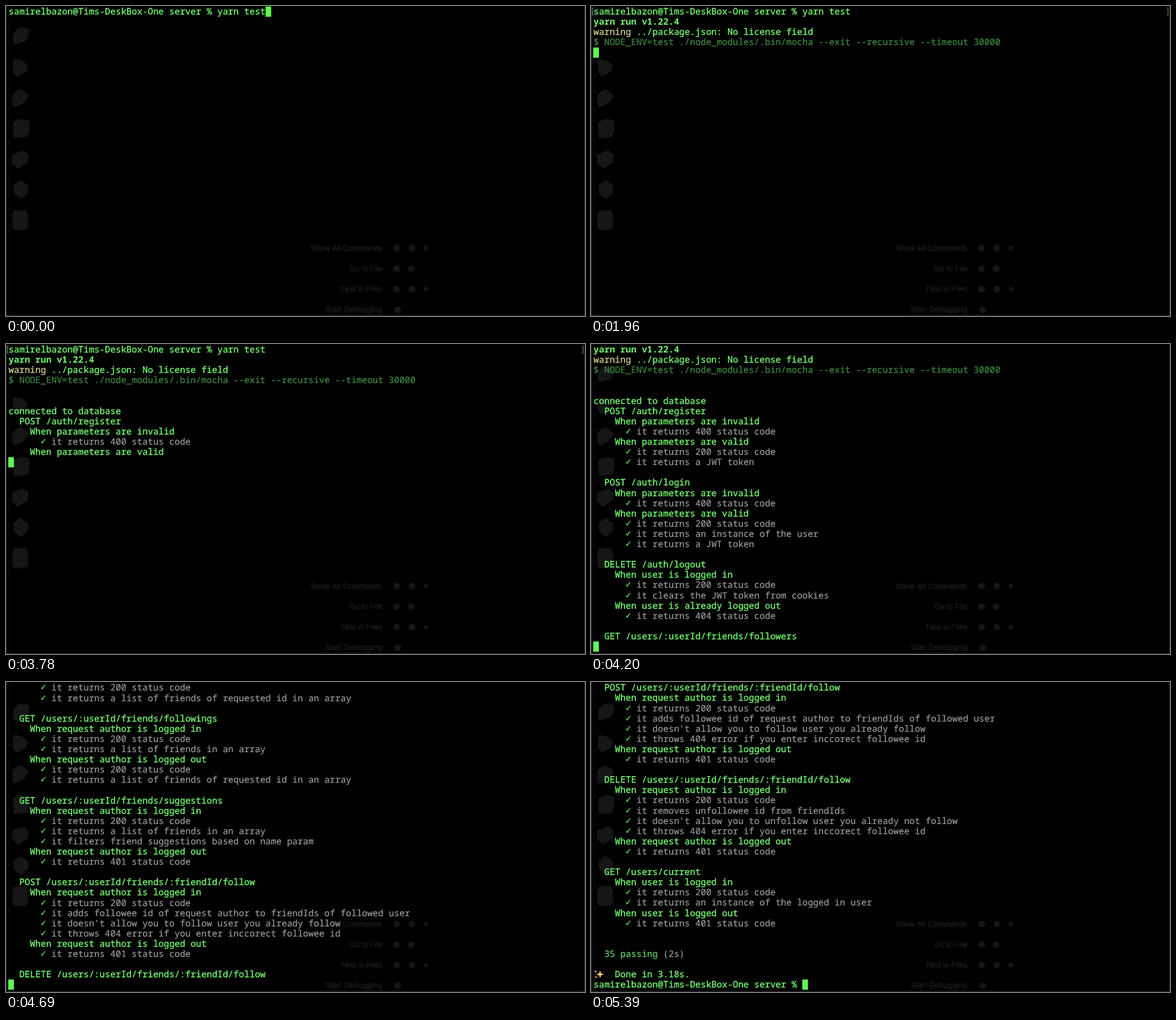
An HTML page that plays this animation: 1023 by 548 pixels, repeating every 5460 ms.

```html
<!DOCTYPE html>
<html lang="en">
<head>
<meta charset="utf-8">
<title>Test run</title>
<style>
  html, body { margin: 0; width: 100%; height: 100%; overflow: hidden; background: #000; }
  #stage { position: absolute; left: 0; top: 0; width: 1023px; height: 548px; overflow: hidden; background: #000; }
  #stage > svg { position: absolute; left: 0; top: 0; }
  #screen {
    position: absolute; left: 4.5px; top: 0;
    font: 15.783px/18.1px "Noto Sans Mono", "DejaVu Sans Mono", monospace;
    font-variant-ligatures: none; text-rendering: geometricPrecision;
    color: #72f56e; -webkit-text-stroke: .4px;
  }
  .row { position: absolute; left: 0; height: 18.1px; white-space: pre; }
  .bold { font-weight: 700; -webkit-text-stroke: 0; }
  .warn { color: #cbc78c; }
  .dim { color: #3f8f40; -webkit-text-stroke: .2px; }
  .grey { color: #9c9c9c; -webkit-text-stroke: .2px; }
  .pass { color: #5fd963; -webkit-text-stroke: .2px; }
  .tick { display: inline-block; width: 9.47px; height: 18.1px; vertical-align: top; color: #4fe052; font-family: "DejaVu Sans Mono", "DejaVu Sans", monospace; }
  .spark { position: absolute; left: 0; top: 1px; }
  #cursor { position: absolute; left: -.5px; top: .5px; width: 10px; height: 18.5px; background: #5ff850; }
</style>
</head>
<body>
<div id="stage">
  <svg width="1023" height="548">
    <defs>
      <filter id="soft" x="-30%" y="-30%" width="160%" height="160%"><feGaussianBlur stdDeviation="1.3"/></filter>
    </defs>
    <path d="M0 0h8v548h-8z" fill="#050308"/>
    <g id="icons" fill="#131313" filter="url(#soft)">
      <path id="first" d="M14 46l9-8 17 2 1 12-7 11-20 5-3-8z"/>
      <path d="M12 94l15 1 12 10-3 11-17 9-7-8z"/>
      <path d="M12 155l14-9 15 12-9 14-18 8-4-9z"/>
      <path d="M12 206l13-7 16 3 1 18-5 12-24 2z"/>
      <path d="M11 262l20-7 9 8-1 14-18 11-11-10z"/>
      <path d="M13 316l13-9 13 10 1 12-13 13-13-10z"/>
      <path d="M14 361h22l3 8v23l-5 4h-20l-3-5v-22z"/>
    </g>
    <g id="hints" fill="#191919" filter="url(#soft)" font-family="Inter, sans-serif" font-size="13" text-anchor="end"></g>
    <path d="M.5 0v548M1022 0v548M0 547h1023" stroke="#383838" fill="none"/>
  </svg>
  <div id="screen"></div>
  <svg id="marks" width="1023" height="22" fill="none" stroke="#6f9a6f">
    <path d="M4.500 3.500h-2v13h2M1017.500 3.500h2v13h-2"/>
  </svg>
</div>
<script>
const LOOP = 5460, PITCH = 18.1, CELL = 9.47, ROWS = 30;
const $ = id => document.getElementById(id);
const PROMPT = 'samirelbazon@Tims-DeskBox-One server % ';

const span = (cls, text) => `<span class="${cls}">${text}</span>`;
const when = text => '    When ' + text;
const it = text => '      ' + span('tick', '✓') + span('grey', ' it ' + text);
const status = code => it(`returns ${code} status code`);
const group = (title, ...body) => ['  ' + title, ...body, ''];

const invalid = when('parameters are invalid');
const valid = when('parameters are valid');
const authorIn = when('request author is logged in');
const authorOut = when('request author is logged out');
const userIn = when('user is logged in');
const token = it('returns a JWT token');
const list = it('returns a list of friends in an array');
const listById = it('returns a list of friends of requested id in an array');
const badId = it('throws 404 error if you enter inccorect followee id');
const friendLists = [authorIn, status(200), list, authorOut, status(200), listById];

const sparkles = `<svg class="spark" width="20" height="18">
  <path d="M11 2l1.700 5.300 5.300 1.700-5.300 1.700-1.700 5.300-1.700-5.300-5.300-1.700 5.300-1.700z" fill="#f2c879"/>
  <path d="M3 1l.8 2.200 2.200.8-2.200.8-.8 2.200-.8-2.200-2.200-.8 2.200-.8zM4 11l.8 2.200 2.200.8-2.200.8-.8 2.200-.8-2.200-2.200-.8 2.200-.8z" fill="#e8a253"/></svg>`;

const lines = [
  PROMPT + 'yarn test',
  span('bold', 'yarn run v1.22.4'),
  span('warn', 'warning') + ' ../package.json: No license field',
  span('dim', '$ NODE_ENV=test ./node_modules/.bin/mocha --exit --recursive --timeout 30000'),
  '', '',
  'connected to database',
  ...group('POST /auth/register', invalid, status(400), valid, status(200), token),
  ...group('POST /auth/login', invalid, status(400), valid, status(200),
    it('returns an instance of the user'), token),
  ...group('DELETE /auth/logout', userIn, status(200), it('clears the JWT token from cookies'),
    when('user is already logged out'), status(404)),
  ...group('GET /users/:userId/friends/followers', ...friendLists),
  ...group('GET /users/:userId/friends/followings', ...friendLists),
  ...group('GET /users/:userId/friends/suggestions', authorIn, status(200), list,
    it('filters friend suggestions based on name param'), authorOut, status(401)),
  ...group('POST /users/:userId/friends/:friendId/follow', authorIn, status(200),
    it('adds followee id of request author to friendIds of followed user'),
    it("doesn't allow you to follow user you already follow"), badId, authorOut, status(401)),
  ...group('DELETE /users/:userId/friends/:friendId/follow', authorIn, status(200),
    it('removes unfollowee id from friendIds'),
    it("doesn't allow you to unfollow user you already not follow"), badId, authorOut, status(401)),
  ...group('GET /users/current', userIn, status(200),
    it('returns an instance of the logged in user'), when('user is logged out'), status(401)),
  '',
  '  ' + span('pass', '35 passing') + span('grey', ' (2s)'),
  '',
  sparkles + '    Done in 3.18s.',
  PROMPT
];

// [time, number of printed lines]
const output = [[0, 1], [1190, 1], [1330, 4], [2240, 11], [3850, 16], [3920, 18], [3990, 24],
  [4060, 29], [4130, 30], [4270, 38], [4340, 41], [4410, 46], [4480, 50], [4550, 54], [4620, 58],
  [4690, 63], [4760, 67], [4830, 72], [4900, 76], [4970, 80], [5040, 83]];
// [time, cursor opacity]
const blink = [[0, 1], [140, .5], [210, 0], [770, 1], [2240, 0], [3570, 1]];
const ENTER = 1190, SCROLLED = 4130;

const at = (steps, t) => steps.reduce((v, [start, value]) => t >= start ? value : v, steps[0][1]);

$('screen').innerHTML = lines.map((html, i) =>
  `<div class="row" style="top:${(i * PITCH).toFixed(1)}px">${html}</div>`).join('') + '<div id="cursor"></div>';
const rows = [...document.querySelectorAll('.row')];

const hints = [['Show All Commands', 690, 717, 742], ['Go to File', 690, 716],
  ['Find in Files', 690, 717, 742], ['Start Debugging', 692]];
$('hints').innerHTML = hints.map(([label, ...keys], i) => {
  const y = 428 + i * 36.3;
  return `<text x="665" y="${y + 4.5}" fill="#2c2c2c">${label}</text>` +
    keys.map((x, k) => `<circle cx="${x}" cy="${y}" r="${k > 1 ? 4 : 6}"/>`).join('');
}).join('');

function draw(t) {
  const count = at(output, t);
  const typing = t < ENTER;
  const done = count === lines.length;
  const line = typing ? 0 : done ? count - 1 : count;
  const column = typing ? PROMPT.length + 9 : done ? PROMPT.length : 0;
  const scroll = Math.max(0, line - ROWS + 1);
  rows.forEach((row, i) => row.style.visibility = i >= scroll && i < count ? 'visible' : 'hidden');
  $('screen').style.transform = `translateY(${-scroll * PITCH}px)`;
  $('cursor').style.transform = `translate(${column * CELL}px, ${line * PITCH}px)`;
  $('cursor').style.opacity = at(blink, t);
  $('marks').style.visibility = !typing && !scroll ? 'visible' : 'hidden';
  $('first').style.visibility = typing || t >= SCROLLED ? 'visible' : 'hidden';
}

const began = performance.now();
function tick() {
  draw((performance.now() - began) % LOOP);
  requestAnimationFrame(tick);
}
tick();
</script>
</body>
</html>
```
